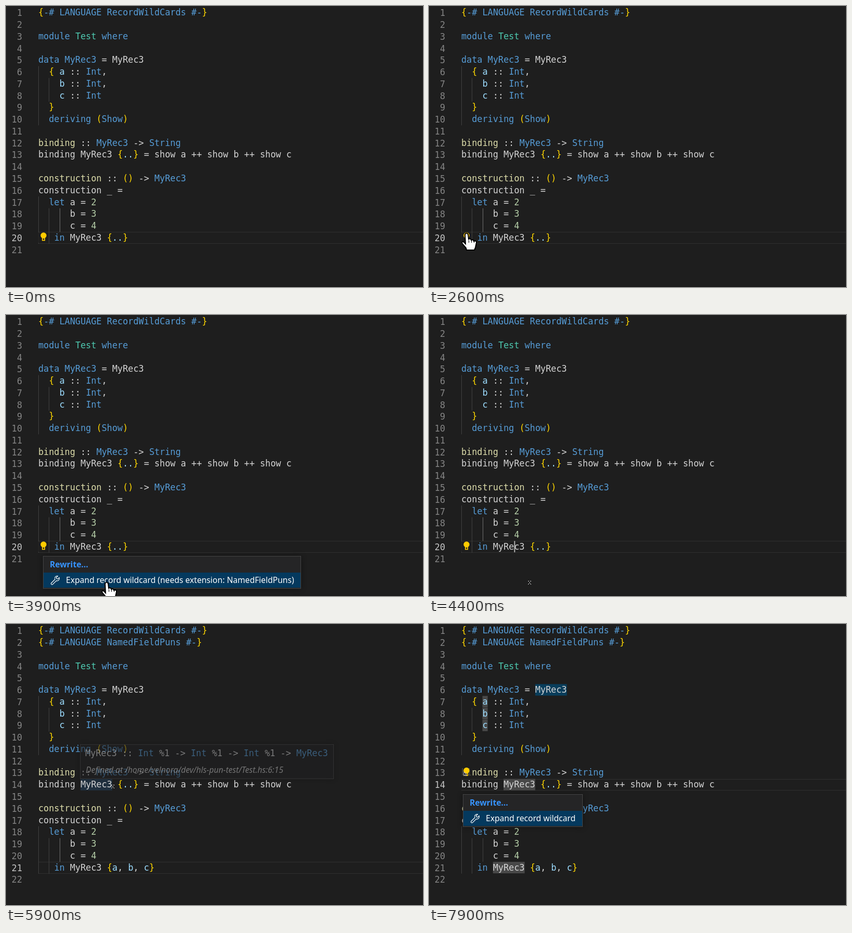
Recreate the animation shown at these times as an HTML page with a canvas. Size 800 by 540 pixels, loop 8 s.

```html
<!DOCTYPE html>
<html lang="en">
<head>
<meta charset="utf-8">
<title>Expand record wildcard</title>
<style>
html, body { margin: 0; width: 100%; height: 100%; overflow: hidden; background: #1e1e1e; }
canvas { display: block; }
</style>
</head>
<body>
<canvas id="stage" width="800" height="540"></canvas>
<script>
const ctx = document.getElementById('stage').getContext('2d');
const LOOP = 8000, STEP = 100;
const LEFT = 62, CHAR = 10.125, ROW = 22.77;
const MONO = '16.82px "DejaVu Sans Mono", monospace';
const UI = '15.6px "Noto Sans", sans-serif';
const BG = '#1e1e1e';

// "^x" inside a code line switches to colour x.
const COLORS = {
  w: '#d4d4d4', b: '#569cd6', t: '#4ec9b0', f: '#9cdcfe',
  g: '#ffd700', y: '#dcdcaa', n: '#b5cea8'
};
const pragma = name => `^g{^b-# LANGUAGE ${name} #-^g}`;
const program = edited => [
  pragma('RecordWildCards'),
  ...(edited ? [pragma('NamedFieldPuns')] : []),
  '',
  '^bmodule ^tTest ^bwhere',
  '',
  '^bdata MyRec3 ^w= MyRec3',
  '  ^g{ ^fa ^w:: ^bInt^w,',
  '    ^fb ^w:: ^bInt^w,',
  '    ^fc ^w:: ^bInt',
  '  ^g}',
  '  ^bderiving ^g(^bShow^g)',
  '',
  '^ybinding ^w:: ^bMyRec3 ^w-> ^bString',
  'binding MyRec3 ^g{^f..^g} ^w= show a ++ show b ++ show c',
  '',
  '^yconstruction ^w:: ^g() ^w-> ^bMyRec3',
  'construction _ =',
  '  ^blet ^wa = ^n2',
  '      ^wb = ^n3',
  '      ^wc = ^n4',
  `   ^bin ^wMyRec3 ^g{${edited ? '^fa^w, ^fb^w, ^fc' : '^f..'}^g}`,
  ''
];

// Pointer stops: time, x, y
const POINTER = [
  [0, 297, 339], [1700, 297, 339], [2300, 72, 437], [3200, 72, 437],
  [3400, 155, 490], [3600, 188, 510], [3800, 188, 510], [3900, 193, 514],
  [4700, 193, 514], [5600, 214, 312], [5700, 205, 312], [6000, 205, 312],
  [6400, 165, 312], [6800, 165, 312], [7100, 121, 320], [7700, 65, 279],
  [7900, 67, 284], [8000, 67, 284]
];
// Pointer shape from each time on
const SHAPES = [
  [0, ''], [100, 'beam'], [2300, 'arrow'], [2600, 'hand'], [3000, 'arrow'],
  [3500, 'hand'], [4200, 'beam'], [7600, 'hand'], [7900, 'arrow']
];

const HAND = new Path2D(`M-3 2 Q0 -3 3 2 L4 11 Q8 9 9 13 Q13 11 14 15 Q19 13 19 18
  L17 27 L15 32 H0 L-1 28 L-8 20 Q-10 15 -6 16 L-2 20 Z`);
const ARROW = new Path2D('M0 0 V8 L2 6 L4 8 L5 7 L3 5 H5 Z');
const WRENCH = new Path2D(`M8 6 L1 13 a1.8 1.8 0 0 0 2.6 2.6 L10.6 8.6
  a4.5 4.5 0 0 0 5.5 -6 l-2.8 2.8 -2.3 -.6 -.6 -2.3 2.8 -2.8 A4.5 4.5 0 0 0 8 6 Z`);

const rowTop = n => 1.6 + ROW * (n - 1);
const colX = c => LEFT + CHAR * c;
const between = (t, from, to) => t >= from && t < to;

function rect(x, y, w, h, color) {
  ctx.fillStyle = color;
  ctx.fillRect(x, y, w, h);
}

function text(str, x, y, color, font) {
  ctx.font = font;
  ctx.fillStyle = color;
  ctx.fillText(str, x, y);
}

function code(line, x, y) {
  let color = 'w';
  line.split(/\^(.)/).forEach((part, i) => {
    if (i % 2) { color = part; return; }
    text(part, x, y, COLORS[color], MONO);
    x += part.length * CHAR;
  });
}

function at(x, y, draw) {
  ctx.save();
  ctx.translate(x, y);
  draw();
  ctx.restore();
}

function mark(row, col, length, color) {
  rect(colX(col), rowTop(row), length * CHAR, ROW - .6, color);
}

function guide(col, first, last, color = '#404040') {
  rect(Math.round(colX(col)), rowTop(first), 1, ROW * (last - first + 1), color);
}

function panel(x, y, w, h) {
  ctx.save();
  ctx.shadowColor = 'rgba(0,0,0,.4)';
  ctx.shadowBlur = 10;
  rect(x, y, w, h, '#252526');
  ctx.restore();
  ctx.strokeStyle = '#454545';
  ctx.lineWidth = 1;
  ctx.strokeRect(x + .5, y + .5, w - 1, h - 1);
}

function menu(x, y, w, label, selected) {
  panel(x, y, w, 63);
  text('Rewrite...', x + 13, y + 22, '#3794ff', 'bold ' + UI);
  if (selected) rect(x + 1, y + 32, w - 2, 29, '#04395e');
  const color = selected ? '#ffffff' : '#cccccc';
  text(label, x + 44, y + 52, color, UI);
  at(x + 15, y + 39, () => {
    ctx.strokeStyle = color;
    ctx.lineWidth = 1.2;
    ctx.stroke(WRENCH);
  });
}

function bulb(row) {
  const y = rowTop(row);
  rect(LEFT, y + 1, 20, ROW - 3, 'rgba(30,30,30,.75)');
  at(72, y, () => {
    ctx.fillStyle = '#ffcc00';
    ctx.beginPath();
    ctx.arc(0, 6.7, 5.7, 0, 7);
    ctx.fill();
    ctx.fillRect(-3, 10, 6, 7);
    rect(-1.4, 12.5, 2.8, 2.8, BG);
  });
}

function hover(alpha) {
  ctx.save();
  ctx.globalAlpha = alpha;
  panel(142, 231, 487, 67);
  code('MyRec3 :: ' + '^bInt ^w%1 -> '.repeat(3) + '^bMyRec3', 152, 254);
  text('Defined at /home/velnora/dev/hls-pun-test/Test.hs:6:15', 153, 286, '#cccccc', 'italic ' + UI);
  ctx.restore();
}

function pointer(t) {
  const shape = SHAPES.findLast(s => s[0] <= t)[1];
  const i = POINTER.findLastIndex(p => p[0] <= t);
  const [t0, x0, y0] = POINTER[i];
  const [t1, x1, y1] = POINTER[Math.min(i + 1, POINTER.length - 1)];
  const k = t1 > t0 ? (t - t0) / (t1 - t0) : 0;
  at(x0 + (x1 - x0) * k, y0 + (y1 - y0) * k, () => {
    if (shape === 'beam') {
      for (const [x, y, w] of [[-3, -3, 2], [1, -3, 2], [-1, 0, 2], [-2, 2, 1], [1, 2, 1], [-3, 3, 1], [2, 3, 1]])
        rect(x, y, w, 1, '#e8e8e8');
    } else if (shape) {
      const hand = shape === 'hand';
      const path = hand ? HAND : ARROW;
      ctx.lineWidth = hand ? 2 : 1;
      ctx.strokeStyle = hand ? '#000' : '#ddd';
      ctx.fillStyle = hand ? '#fff' : '#111';
      ctx.fill(path);
      ctx.stroke(path);
      if (hand) for (const x of [4, 9, 14]) rect(x, 13, 1, 5, '#000');
    }
  });
}

function draw(t) {
  const edited = t >= 4500, clicked = t >= 6400;
  const shift = edited ? 1 : 0;
  const active = clicked ? 14 : 20 + shift;

  rect(0, 0, 800, 540, BG);
  rect(0, 538, 800, 2, '#191919');
  rect(LEFT, Math.round(rowTop(active)), 738, 1, '#303030');
  rect(LEFT, Math.round(rowTop(active) + 21.5), 738, 1, '#303030');

  if (between(t, 5900, 6400)) mark(14, 8, 6, '#20303f');
  if (t >= 6600) {
    mark(14, 8, 6, '#484848');
    mark(21, 6, 6, '#484848');
  }
  if (t >= 6900) {
    mark(6, 14, 6, '#083d5b');
    for (const row of [7, 8, 9]) mark(row, 4, 1, '#484848');
  }

  guide(0, 6 + shift, 10 + shift);
  guide(2, 7 + shift, 8 + shift);
  guide(0, 17 + shift, 20 + shift);
  guide(2, 18 + shift, 20 + shift);
  guide(4, 18 + shift, 19 + shift, clicked ? '#404040' : '#707070');

  program(edited).forEach((line, i) => {
    const n = i + 1, y = rowTop(n) + 16.6;
    ctx.textAlign = 'right';
    text(n, 31, y + 1, n === active ? '#c6c6c6' : '#858585', MONO);
    ctx.textAlign = 'left';
    code(line, LEFT, y);
  });

  if (between(t, 4200, 4600) || between(t, 5100, 5600) || between(t, 6100, 6900))
    rect(colX(10), rowTop(active), 2, ROW - 1, '#aeafad');

  if (!edited) bulb(20);
  if (t >= 6900) bulb(13);
  if (between(t, 5900, 6400)) hover(t < 6000 ? .5 : 1);
  if (between(t, 2900, 4200))
    menu(71, 463, 495, 'Expand record wildcard (needs extension: NamedFieldPuns)', !between(t, 3300, 3500));
  if (t >= 7800) menu(65, 327, 230, 'Expand record wildcard', true);
  pointer(t);
}

function frame() {
  const t = performance.now() % LOOP;
  draw(Math.floor(t / STEP) * STEP);
  requestAnimationFrame(frame);
}
frame();
</script>
</body>
</html>
```
